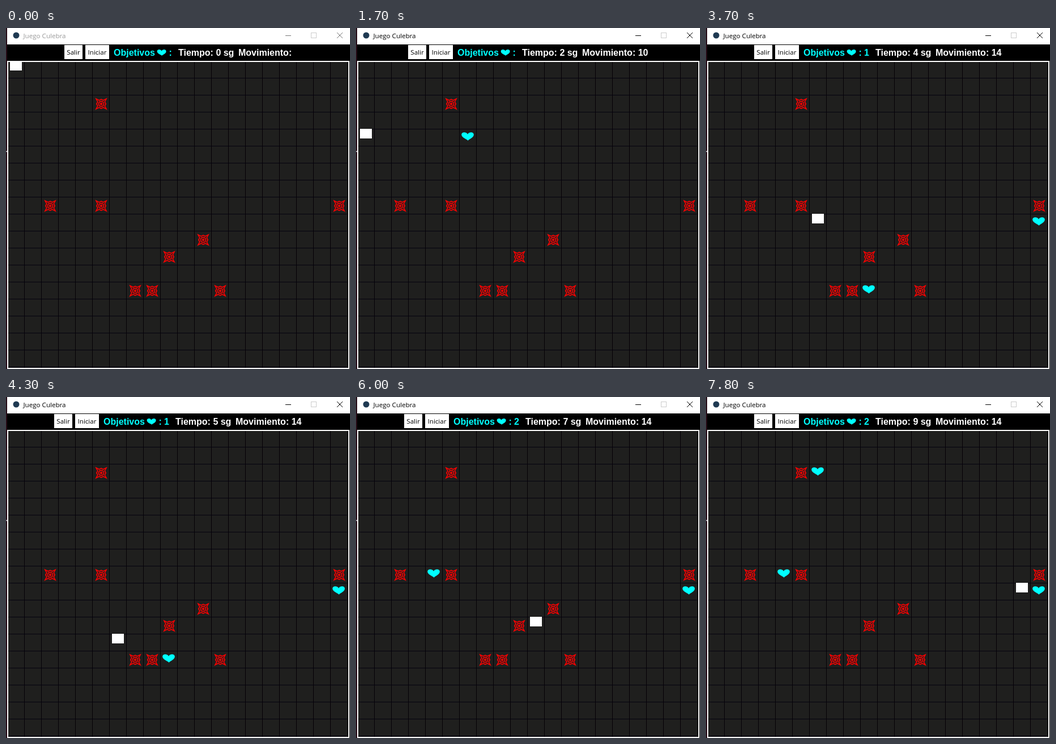
Animation of 607x602 px, one loop 8 s. Source, as an HTML page:

```html
<!DOCTYPE html>
<html lang="es">
<head>
<meta charset="utf-8">
<title>Juego Culebra</title>
<style>
html, body { margin: 0; width: 100%; height: 100%; overflow: hidden; background: #000; }
svg { display: block; }
.ui { font: 11.6px "Open Sans", "Noto Sans", sans-serif; }
.hud { font: bold 16px "Liberation Sans", Arial, sans-serif; fill: #fff; }
.cyan { fill: #0ff; }
rect { shape-rendering: crispEdges; }
</style>
</head>
<body>
<svg width="607" height="602" viewBox="0 0 607 602">
  <defs>
    <path id="heart" fill="#0ff" d="M.5 7.2C-1.5 4.6-10.8 2.4-10.8-3.2C-10.8-6-8.4-7.3-6-7.3C-3-7.3-.8-5.8 0-3.8C.8-5.8 3-7.3 6-7.3C8.4-7.3 10.8-6 10.8-3.2C10.8 2.4 2.5 4.6.5 7.2Z"/>
    <g id="mine" fill="none" stroke="#f00" stroke-width="1.6">
      <path d="M-9-9L-3.5-6.2L0-8.2L3.5-6.2L9-9L6.2-3.5L8.2 0L6.2 3.5L9 9L3.5 6.2L0 8.2L-3.5 6.2L-9 9L-6.2 3.5L-8.2 0L-6.2-3.5Z"/>
      <path d="M-3.4-3.4L0-4.6L3.4-3.4L4.6 0L3.4 3.4L0 4.6L-3.4 3.4L-4.6 0Z"/>
      <circle r="1.4"/>
    </g>
  </defs>

  <rect width="607" height="602"/>
  <rect width="2" height="602" fill="#260c17"/>
  <rect y="217" width="2" height="2" fill="#a8a0a8"/>
  <rect id="glint" y="200" width="2" height="4" fill="#a89a30"/>

  <rect x="2" width="605" height="29" fill="#fff"/>
  <circle cx="18" cy="13" r="5.5" fill="#1f3a52"/>
  <text id="title" class="ui" x="30.5" y="18">Juego Culebra</text>
  <rect x="538.5" y="8.5" width="9" height="9" fill="none" stroke="#ccc"/>
  <g id="controls">
    <path d="M493 13.5H503" shape-rendering="crispEdges"/>
    <path d="M584 8L594 18M594 8L584 18"/>
  </g>

  <g id="bar" class="hud">
    <rect x="103" y="30" width="32" height="25" fill="#fff"/>
    <rect x="140" y="30" width="42" height="25" fill="#fff"/>
    <g class="ui" fill="#000" text-anchor="middle">
      <text x="119" y="47">Salir</text>
      <text x="161" y="47">Iniciar</text>
    </g>
    <g class="cyan">
      <text x="190" y="49">Objetivos</text>
      <use href="#heart" transform="translate(274.6 43.5) scale(.74)"/>
      <text x="287.5" y="49">:</text>
      <text id="score" x="297" y="49"></text>
    </g>
    <g id="stats">
      <text id="clock" x="304" y="49"></text>
      <text id="steps" x="410" y="49"></text>
    </g>
  </g>

  <rect x="2" y="58" width="604" height="544" fill="#fff"/>
  <rect x="4" y="60" width="600" height="540" fill="#1f1f1e"/>
  <g id="board"></g>
  <rect id="snake" width="21" height="17" fill="#fff"/>
</svg>
<script>
const LOOP = 8000, CELL = 30;
const $ = id => document.getElementById(id);

function add(name, attrs) {
  const el = document.createElementNS("http://www.w3.org/2000/svg", name);
  for (const key in attrs) el.setAttribute(key, attrs[key]);
  return $("board").appendChild(el);
}

for (let k = 1; k <= 20; k++)
  add("rect", { x: 2 + CELL * k, y: 60, width: 1, height: 540, fill: "#050006" });
for (let k = 1; k <= 18; k++)
  add("rect", { x: 4, y: 58 + CELL * k, width: 600, height: 1, fill: "#04020e" });

// [column, row]
const mines = [[5, 2], [2, 8], [5, 8], [19, 8], [11, 10], [9, 11], [7, 13], [8, 13], [12, 13]];
for (const [c, r] of mines)
  add("use", { href: "#mine", x: 18 + CELL * c, y: 74 + CELL * r });

// [column, row, appears, eaten]
const hearts = [
  [6, 4, 1000, 2800], [9, 13, 2500, 5400], [19, 9, 3600, LOOP],
  [4, 8, 5700, LOOP], [6, 2, 7500, LOOP]
].map(([c, r, from, to]) => ({
  from, to, el: add("use", { href: "#heart", x: 17 + CELL * c, y: 71.5 + CELL * r })
}));

const ticks = [200, 1100, 2000, 2900, 3800, 4800, 5700, 6600, 7500];
const dirs = { R: [1, 0], D: [0, 1], U: [0, -1] };
const route = "D".repeat(4) + "R".repeat(6) + "D".repeat(10) + "RRRURUUUU" + "R".repeat(8);
const quick = [6, 12, 21, 27, 33]; // moves that follow after a single short beat
const moves = [];
let clock = 900;
[...route].forEach((dir, i) => {
  clock += quick.includes(i) ? 100 : 200;
  moves.push({ at: clock, step: dirs[dir] });
});

function show(el, on) {
  el.setAttribute("visibility", on ? "visible" : "hidden");
}

function draw(t) {
  const active = t >= 900, started = t >= 1000;
  const score = t >= 5400 ? 2 : t >= 2800 ? 1 : 0;

  $("title").setAttribute("fill", active ? "#000" : "#999");
  $("controls").setAttribute("stroke", active ? "#000" : "#777");
  show($("glint"), t >= 4800 && t < 5100);

  const shift = score ? -18 : started ? -11 : 0;
  $("bar").setAttribute("transform", `translate(${shift})`);
  $("stats").setAttribute("transform", `translate(${score ? 13 : 0})`);
  $("score").textContent = score || "";
  $("clock").textContent = `Tiempo: ${ticks.filter(at => at <= t).length} sg`;
  $("steps").textContent = "Movimiento:" + (score ? " 14" : started ? " 10" : "");

  let c = 0, r = 0;
  for (const { at, step } of moves) {
    if (at > t) break;
    c += step[0];
    r += step[1];
  }
  $("snake").setAttribute("x", 7 + CELL * c);
  $("snake").setAttribute("y", 58 + CELL * r);
  for (const h of hearts) show(h.el, t >= h.from && t < h.to);
}

const start = performance.now();
function frame() {
  draw((performance.now() - start) % LOOP);
  requestAnimationFrame(frame);
}
frame();
</script>
</body>
</html>
```
